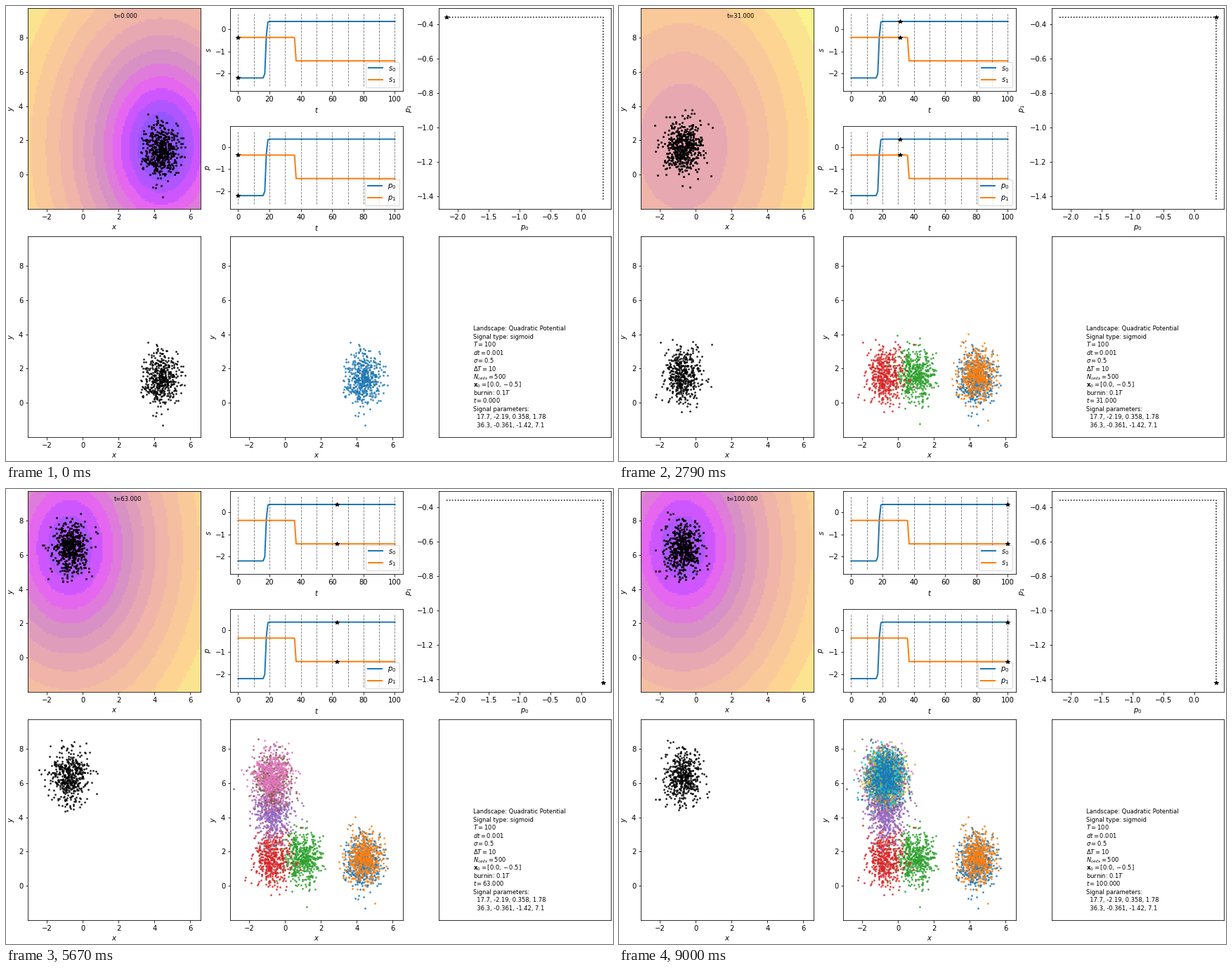
Recreate the animation shown at these times as a matplotlib script. Size 864x648 px, loop 9.09 s.

```python
import numpy as np
import matplotlib.pyplot as plt
from matplotlib.animation import FuncAnimation
from matplotlib.colors import LinearSegmentedColormap

W, H, DPI = 864, 648, 72
T, CELLS, SIGMA, BURN = 100, 500, 0.5, 10
SAMPLE = 10
COL, ROW, HALF = 245.3, 286.0, 118.4
XLIM, YLIM = (-3.06, 6.56), (-2.0, 9.72)
# onset, start, end, rate
SIGNALS = [(17.7, -2.19, 0.358, 1.78), (36.3, -0.361, -1.42, 7.1)]
STIFF = np.array([0.5, 2 / 9])


def signal(t):
    """Both sigmoid signals at time t."""
    return np.array([a + (b - a) * 0.5 * (1 + np.tanh(r * (t - c)))
                     for c, a, b, r in SIGNALS])


def simulate(dt=0.05):
    """Noisy descent of all cells; one snapshot per unit of time."""
    rng = np.random.default_rng(7)
    cells = np.tile([0.0, -0.5], (CELLS, 1))
    steps = round(1 / dt)
    shots = []
    for i in range(-BURN * steps, T * steps + 1):
        if i >= 0 and i % steps == 0:
            shots.append(cells.copy())
        p = signal(max(i, 0) * dt)
        noise = rng.normal(size=cells.shape)
        cells = cells - (STIFF * cells + p) * dt + SIGMA * np.sqrt(dt) * noise
    return shots


def centers(lim, n=100):
    edges = np.linspace(*lim, n + 1)
    return (edges[:-1] + edges[1:]) / 2


# Evenly spaced bands on a log scale above the lowest point
BANDS = 13
GX, GY = np.meshgrid(centers(XLIM), centers(YLIM))
FLOOR = -0.5 * np.sum(signal(0)**2 / STIFF)
CMAP = LinearSegmentedColormap.from_list("bands", [
    (0, "#9456ff"), (2 / BANDS, "#ce56ff"), (3 / BANDS, "#e666f0"),
    (5 / BANDS, "#d892c4"), (8 / BANDS, "#f0b4aa"), (11 / BANDS, "#fed492"),
    (1, "#f9f48e")])


def landscape(t):
    p0, p1 = signal(t)
    phi = GX**2 / 4 + GY**2 / 9 + p0 * GX + p1 * GY
    band = np.ceil((np.log1p(phi - FLOOR) - 0.36) / 0.23)
    return np.clip(band, 0, BANDS) / BANDS


INFO = ["Landscape: Quadratic Potential", "Signal type: sigmoid",
        "$T=100$", "$dt=0.001$", r"$\sigma=0.5$", r"$\Delta T=10$",
        "$N_{cells}=500$", r"$\mathbf{x}_0=[0.0, -0.5]$",
        "burnin: $0.1T$", "", "Signal parameters:"]
INFO += ["  " + ", ".join(f"{v:.3g}" for v in s) for s in SIGNALS]
CLOCK_ROW = INFO.index("")

plt.rcParams.update({"font.family": "DejaVu Sans", "font.size": 10,
                     "lines.linewidth": 2})
fig = plt.figure(figsize=(W / DPI, H / DPI), dpi=DPI, facecolor="white")


def panel(left, top, height, xlim, ylim, xticks, yticks, xlabel="", ylabel=""):
    ax = fig.add_axes([left / W, 1 - (top + height) / H, COL / W, height / H])
    ax.set(xlim=xlim, ylim=ylim, xticks=xticks, yticks=yticks,
           xlabel=xlabel, ylabel=ylabel)
    return ax


def plane(left, top):
    return panel(left, top, ROW, XLIM, YLIM, range(-2, 7, 2),
                 range(0, 9, 2), "$x$", "$y$")


def dots(ax, color, alpha=0.85, size=2.8):
    return ax.plot([], [], "o", ms=size, mew=0, color=color, alpha=alpha)[0]


def star(ax):
    return ax.plot([], [], "*", color="k", ms=6, zorder=6)[0]


shots = simulate()
times = np.arange(T + 1)
curves = signal(times)

# Landscape with moving cells
ax_land = plane(31.2, 3)
image = ax_land.imshow(landscape(0), origin="lower", aspect="auto",
                       cmap=CMAP, vmin=0, vmax=1, extent=(*XLIM, *YLIM),
                       interpolation="nearest")
cloud = dots(ax_land, "k", 0.95, 3)
clock = ax_land.text(0.5, 0.95, "", fontsize="small",
                     transform=ax_land.transAxes)

# Signals and parameters over time
trace_stars = []
for top, name in ((3, "s"), (3 + ROW - HALF, "p")):
    ax = panel(319.3, top, HALF, (-5, 105), (-2.79, 0.96),
               range(0, 101, 20), (-2, -1, 0), "$t$", f"${name}$")
    for k, curve in enumerate(curves):
        ax.plot(times, curve, label=f"${name}_{k}$")
    ax.vlines(range(0, 101, SAMPLE), -2.57, 0.7, colors="k",
              linestyles="--", linewidth=0.9, alpha=0.5)
    ax.legend(loc="lower right")
    trace_stars.append(star(ax))

# Path through parameter space
ax_path = panel(615.7, 3, ROW, (-2.317, 0.485), (-1.473, -0.308),
                np.arange(-2, 0.1, 0.5), np.arange(-1.4, -0.3, 0.2),
                "$p_0$", "$p_1$")
ax_path.plot(*curves, "k:", lw=1.5)
path_star = star(ax_path)

# Latest sample, and all samples so far
latest = dots(plane(31.2, 328), "k")
ax_all = plane(319.3, 328)
samples = []
for k in range(T // SAMPLE + 1):
    layer = dots(ax_all, f"C{k % 10}")
    layer.set_data(*shots[k * SAMPLE].T)
    samples.append(layer)

# Notes, one evenly spaced line each
ax_info = panel(615.7, 328, ROW, (0, 1), (0, 1), [], [])
notes = [ax_info.text(0.2, 0.05 + 0.04 * i, line, fontsize="small")
         for i, line in enumerate(reversed(INFO))][::-1]


def update(t):
    p = signal(t)
    image.set_data(landscape(t))
    cloud.set_data(*shots[t].T)
    clock.set_text(f"t={t:.3f}")
    notes[CLOCK_ROW].set_text(f"$t={t:.3f}$")
    for mark in trace_stars:
        mark.set_data([t, t], p)
    path_star.set_data(p[:1], p[1:])
    k = t // SAMPLE
    latest.set_data(*shots[k * SAMPLE].T)
    for i, layer in enumerate(samples):
        layer.set_visible(i <= k)
    return []


anim = FuncAnimation(fig, update, frames=T + 1, interval=90,
                     init_func=lambda: update(0), repeat=True, repeat_delay=0)
plt.show()
```
